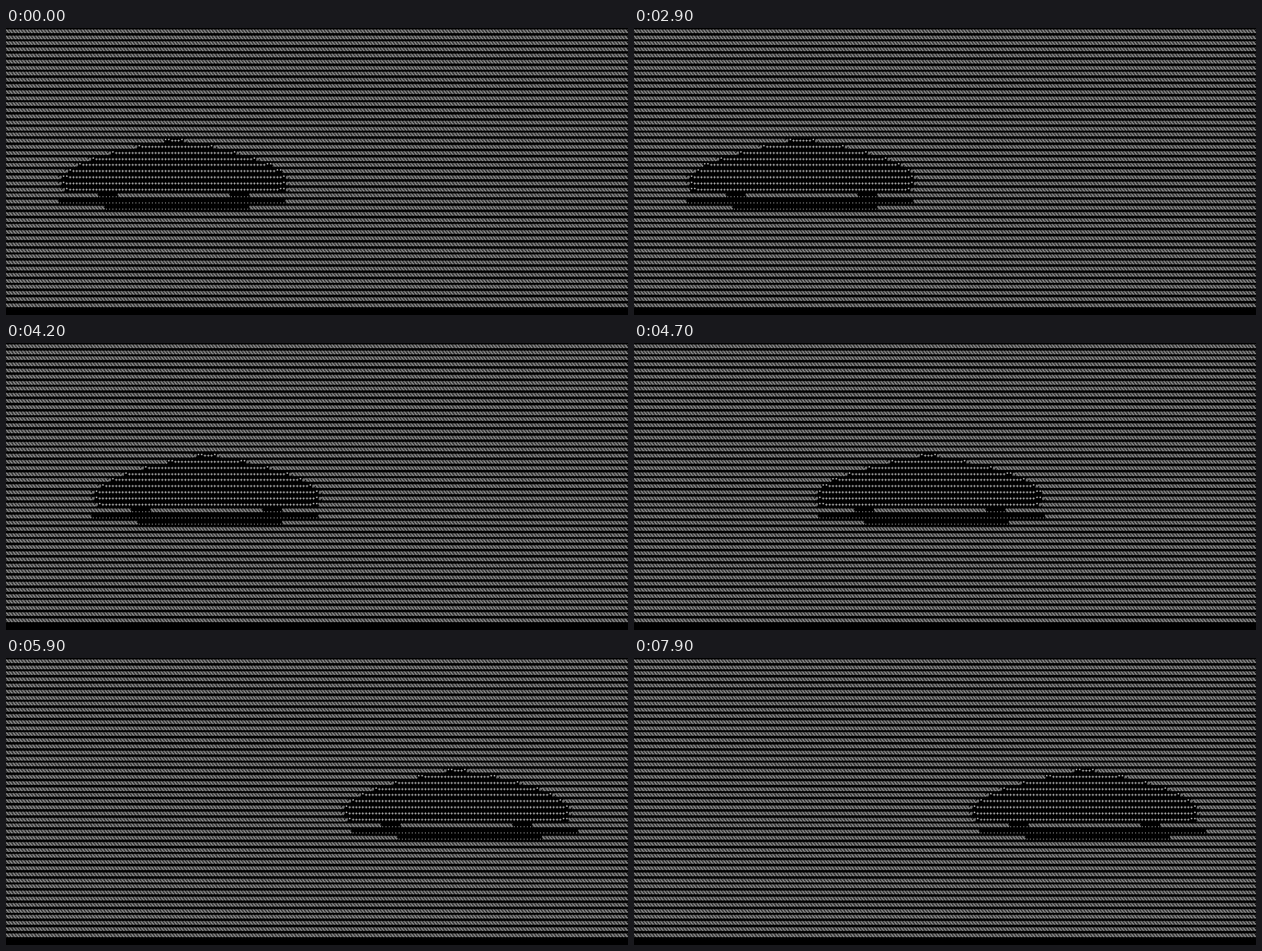
Animation, 1101 px wide and 509 px high, one loop 8 s. Source, as an HTML page with a canvas:

```html
<!DOCTYPE html>
<html lang="en">
<head>
<meta charset="utf-8">
<title>Text-mode scene</title>
<style>
  html, body { margin: 0; width: 100%; height: 100%; overflow: hidden; background: #000; }
  canvas { display: block; }
</style>
</head>
<body>
<canvas id="stage" width="1101" height="509"></canvas>
<script>
const ctx = document.getElementById('stage').getContext('2d');
const LOOP = 8000, STEP = 100;
const COLS = 189, ROWS = 46;
const CELL_H = 497 / ROWS, FONT_SIZE = 9.71;
const START_X = 298, TRAVEL = 500;
const HALF_WIDTH = 203, DOME_HEIGHT = 74, DOME_BASE = 270, DOME_BOTTOM = 293;

const clamp = (v, lo, hi) => Math.min(hi, Math.max(lo, v));
const progress = (t, from, to) => clamp((t - from) / (to - from), 0, 1);
const easeSine = u => (1 - Math.cos(Math.PI * u)) / 2;

function poseAt(t) {
  return {
    shift: TRAVEL * easeSine(progress(t, 3755, 5775)),
    tilt: Math.sin(Math.PI * progress(t, 2850, 3850)),
  };
}

function shadowAt(x, row, { shift, tilt }) {
  const dx = x - START_X - shift * 1.04;
  if (row === 27) {
    const d = Math.abs(x - START_X - shift);
    return d < 135 && (d > 98 || tilt > 0.5);
  }
  if (row === 28) return Math.abs(dx + 4) < 202;
  return row === 29 && Math.abs(dx - 2) < 128;
}

// A plain dome: parabolic outline above a flat, tiltable base.
function domeChar(x, y, { shift, tilt }) {
  const dx = x - START_X - shift + 10 * tilt;
  const localY = y + tilt * (10 + 0.055 * dx);
  if (localY > DOME_BOTTOM) return '';
  const d = (localY - DOME_BASE) / DOME_HEIGHT;
  const margin = 1 - d * d * (d < 0 ? 1 : 0.3) - Math.abs(dx) / HALF_WIDTH;
  if (margin < 0) return '';
  return margin < 0.025 ? '#' : margin < 0.06 ? '*' : '+';
}

function cellChar(col, row, advance, pose) {
  const x = (col + 0.5) * advance, y = (row + 0.5) * CELL_H;
  if (shadowAt(x, row, pose)) return '.';
  return domeChar(x, y, pose) || '%';
}

function draw(t) {
  const pose = poseAt(t);
  ctx.fillStyle = '#000';
  ctx.fillRect(0, 0, 1101, 509);
  ctx.font = `${FONT_SIZE}px "Liberation Mono", monospace`;
  ctx.textRendering = 'geometricPrecision';
  ctx.textBaseline = 'alphabetic';
  ctx.fillStyle = '#fff';
  const advance = ctx.measureText('%'.repeat(COLS)).width / COLS;
  for (let row = 0; row < ROWS; row++) {
    let line = '';
    for (let col = 0; col < COLS; col++) line += cellChar(col, row, advance, pose);
    ctx.fillText(line, 0, row * CELL_H + 8.7);
  }
}

let lastStep = -1;
function tick() {
  const step = Math.floor(performance.now() % LOOP / STEP);
  if (step !== lastStep) draw(step * STEP);
  lastStep = step;
  requestAnimationFrame(tick);
}
tick();
</script>
</body>
</html>
```
